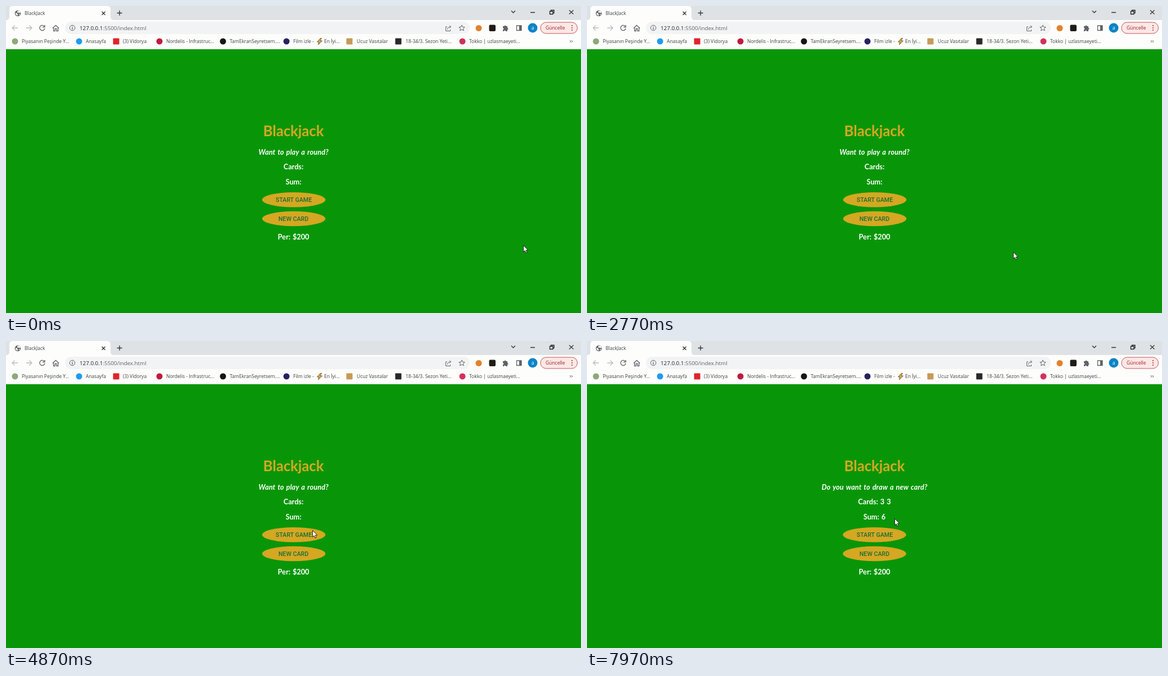
Write an HTML page that moves like this. It is 1023 px wide and 547 px high and loops after 8 s.

```html
<!DOCTYPE html>
<html lang="tr">
<head>
<meta charset="utf-8">
<title>BlackJack</title>
<style>
  html, body { margin: 0; width: 100%; height: 100%; overflow: hidden; }
  svg { display: block; width: 1023px; height: 547px; }
  text { white-space: pre; }
  .ui { font-family: "Open Sans", sans-serif; font-size: 8.5px; fill: #3c4043; }
  .ui .address { font-size: 9.8px; fill: #5f6368; }
  .line { fill: none; stroke: #5f6368; stroke-width: 1.3; }
  .thin { stroke-width: 1; }
  .game { font: bold 12.7px Lato, sans-serif; word-spacing: 1px; fill: #fff; text-anchor: middle; }
  .game .title { font-size: 25.7px; fill: #d6a722; }
  .game .ask { font-style: italic; letter-spacing: .13px; }
  .game .button { font: 500 10.7px Roboto, sans-serif; word-spacing: 0; fill: #147036; }
  ellipse { fill: #d5a722; }
</style>
</head>
<body>
<svg viewBox="0 0 1023 547">
  <rect width="1023" height="547" fill="#089608"/>

  <g class="ui">
    <rect width="1023" height="26" fill="#dee2e4"/>
    <path d="M0 25Q6 25 6 19V6Q6 0 12 0H180Q186 0 186 6V19Q186 25 192 25H1023V77H0Z" fill="#fdfdfc"/>
    <circle cx="21" cy="13" r="5.3" fill="#5f6368"/>
    <path d="M17 12l3 1 1 3-1 1.5-3-3zM20 9l4-.5 2 3-2 1-2-1-2 .5zM23 14l2 0-2 3z" fill="#fff"/>
    <text x="33" y="16">BlackJack</text>
    <path class="line" d="M170.500 10l6 6m0-6l-6 6M197.500 12.500h9m-4.500-4.500v9M899 8.500l3.500 3.500 3.500-3.500M933 11.500h8M1002 7.500l7.500 7m0-7l-7.500 7" style="stroke:#303134"/>
    <path class="line" d="M967.500 9.500h5.500v5h-5.500zM969.500 9v-1.500h5.500v5h-1.500" style="stroke:#202124"/>

    <g class="line">
      <path d="M21 39H11m4.500-4.500L11 39l4.500 4.500M36 39h10m-4.500-4.500L46 39l-4.500 4.500" stroke="#babcbe"/>
      <path d="M68 36A4.600 4.600 0 1 0 69 40M69 34v3.500h-4M83 39.500l5.500-5 5.500 5M84.500 38.500v6h2.700v-4h2.700v4h2.700v-6"/>
    </g>
    <rect x="105" y="28" width="720" height="22" rx="11" fill="#f1f3f4"/>
    <circle class="line thin" cx="118" cy="39" r="4.700"/>
    <path class="line" d="M118 38v4M118 36v1"/>
    <text class="address" x="131" y="42.700"><tspan fill="#202124">127.0.0.1</tspan>:5500/index.html</text>
    <path class="line thin" d="M785 37h-2.500v7.500h8V42M785.500 42q0-5 6-5m-2.500-2.500L791.500 37l-2.500 2.500"/>
    <path class="line thin" d="M811 34l1.500 3.500 3.700.3-2.800 2.400.9 3.700-3.300-2-3.300 2 .9-3.700-2.800-2.400 3.700-.3z"/>
    <circle cx="841" cy="39.500" r="5.500" fill="#e2812a"/>
    <rect x="859.500" y="33.500" width="11.500" height="11.500" rx="2" fill="#1e1c18"/>
    <path d="M884 36h2.500a1.500 1.500 0 0 1 3 0H892v3a1.500 1.500 0 0 1 0 3v3h-3a1.500 1.500 0 0 0-3 0h-2v-3a1.500 1.500 0 0 0 0-3z" fill="#5f6368"/>
    <path class="line" d="M908.500 35h8.500v8.500h-8.500z"/>
    <path d="M913 35h4v8.500h-4z" fill="#5f6368"/>
    <circle cx="937" cy="39" r="8.500" fill="#0b84c6"/>
    <text x="937" y="42" text-anchor="middle" style="fill:#fff">a</text>
    <rect x="951" y="29" width="65.500" height="20" rx="10" fill="#fce8e6" stroke="#c5545b"/>
    <text x="960" y="42" style="fill:#a51d2a">Güncelle</text>
    <path d="M1007 35v9" stroke="#a51d2a" stroke-width="2" stroke-linecap="round" stroke-dasharray="0 4"/>
    <g id="bookmarks"></g>
    <path d="M559.500 57.500l-6 6.500h3.500l-1.500 5 7-7h-4l3-4.500z" fill="#f6b62c" stroke="#333" stroke-width=".8"/>
    <path class="line thin" d="M1003 61l2 2-2 2m3-4l2 2-2 2"/>
  </g>

  <g class="game">
    <text class="title" x="511.500" y="232">Blackjack</text>
    <text class="ask" id="ask" x="511.500" y="264.500"></text>
    <text id="cards" x="511.500" y="291"></text>
    <text id="sum" x="511.500" y="317.500"></text>
    <g id="ovals">
      <ellipse cx="512" cy="345.200" rx="56.300" ry="13.200"/>
      <ellipse cx="512" cy="379" rx="56.300" ry="13.200"/>
    </g>
    <text class="button" x="512" y="349">START GAME</text>
    <text class="button" x="511.500" y="382.800">NEW CARD</text>
    <text x="511.500" y="415.800">Per: $200</text>
  </g>

  <g id="pointer">
    <path id="arrow" d="M.5 .5V12.300L3.200 9.800 5 14 7 13.100 5.200 9H8.800Z" fill="#fff" stroke="#111" stroke-width=".9"/>
    <path id="beam" d="M-2.500-6H2.500M0-6V6.500M-2.500 6.500H2.500" fill="none" stroke="#0b2a0b"/>
  </g>
</svg>
<script>
const LOOP = 8000, DEAL_AT = 5640;
const byId = id => document.getElementById(id);

// icon x, icon colour, round icon, label x, label
const bookmarks = [
  [16, '#8da878', true, 28, 'Piyasanın Peşinde Y...'],
  [130, '#1d9bf0', true, 142, 'Anasayfa'],
  [196, '#e0242b', false, 208, '(3) Vidorya'],
  [273, '#c2183c', true, 285, 'Nordelis - Infrastruc...'],
  [386, '#161616', true, 398, 'TamEkranSeyretsem....'],
  [499, '#29215f', true, 511, 'Film izle -'],
  [null, '', false, 566, 'En İyi...'],
  [611, '#c79a55', false, 624, 'Ucuz Vasıtalar'],
  [698, '#29292b', false, 711, '18-34/3. Sezon Yeti...'],
  [812, '#d3315c', true, 824, 'Tokko | uzlasmaeyeti...']
];
byId('bookmarks').innerHTML = bookmarks.map(([x, color, round, labelX, label]) =>
  (x === null ? '' : `<rect x="${x - 5.5}" y="57.500" width="11" height="11" rx="${round ? 5.5 : 1}" fill="${color}"/>`) +
  `<text x="${labelX}" y="66">${label}</text>`).join('');

// time, x, y
const path = [
  [0, 920, 426], [1600, 920, 426], [1830, 868, 433], [2400, 784, 438],
  [2770, 758, 438], [3250, 690, 397], [3700, 545, 308], [3970, 515, 291],
  [4150, 515, 291], [4900, 546, 339], [5400, 525, 345], [6470, 525, 345],
  [7000, 508, 274], [7270, 545, 266], [7580, 585, 298], [7970, 547, 316], [LOOP, 547, 316]
];

function pointerAt(t) {
  const i = path.findIndex(p => p[0] > t);
  const [t0, x0, y0] = path[i - 1], [t1, x1, y1] = path[i];
  const k = (t - t0) / (t1 - t0);
  return [Math.round(x0 + (x1 - x0) * k), Math.round(y0 + (y1 - y0) * k)];
}

function setText(id, value) {
  const node = byId(id);
  if (node.textContent !== value) node.textContent = value;
}

function draw() {
  const t = performance.now() % LOOP;
  const dealt = t >= DEAL_AT;
  setText('ask', dealt ? 'Do you want to draw a new card?' : 'Want to play a round?');
  setText('cards', dealt ? 'Cards: 3 3' : 'Cards:');
  setText('sum', dealt ? 'Sum: 6' : 'Sum:');
  byId('ovals').setAttribute('transform', `translate(${dealt ? -0.5 : 0})`);

  const [x, y] = pointerAt(t);
  const overText = y > 252 && y < 326 && Math.abs(x - 512) < (y < 270 ? 95 : 30);
  byId('pointer').setAttribute('transform', `translate(${x + (overText ? 0.5 : 0)} ${y})`);
  byId('arrow').style.display = overText ? 'none' : '';
  byId('beam').style.display = overText ? '' : 'none';
  requestAnimationFrame(draw);
}
draw();
</script>
</body>
</html>
```
